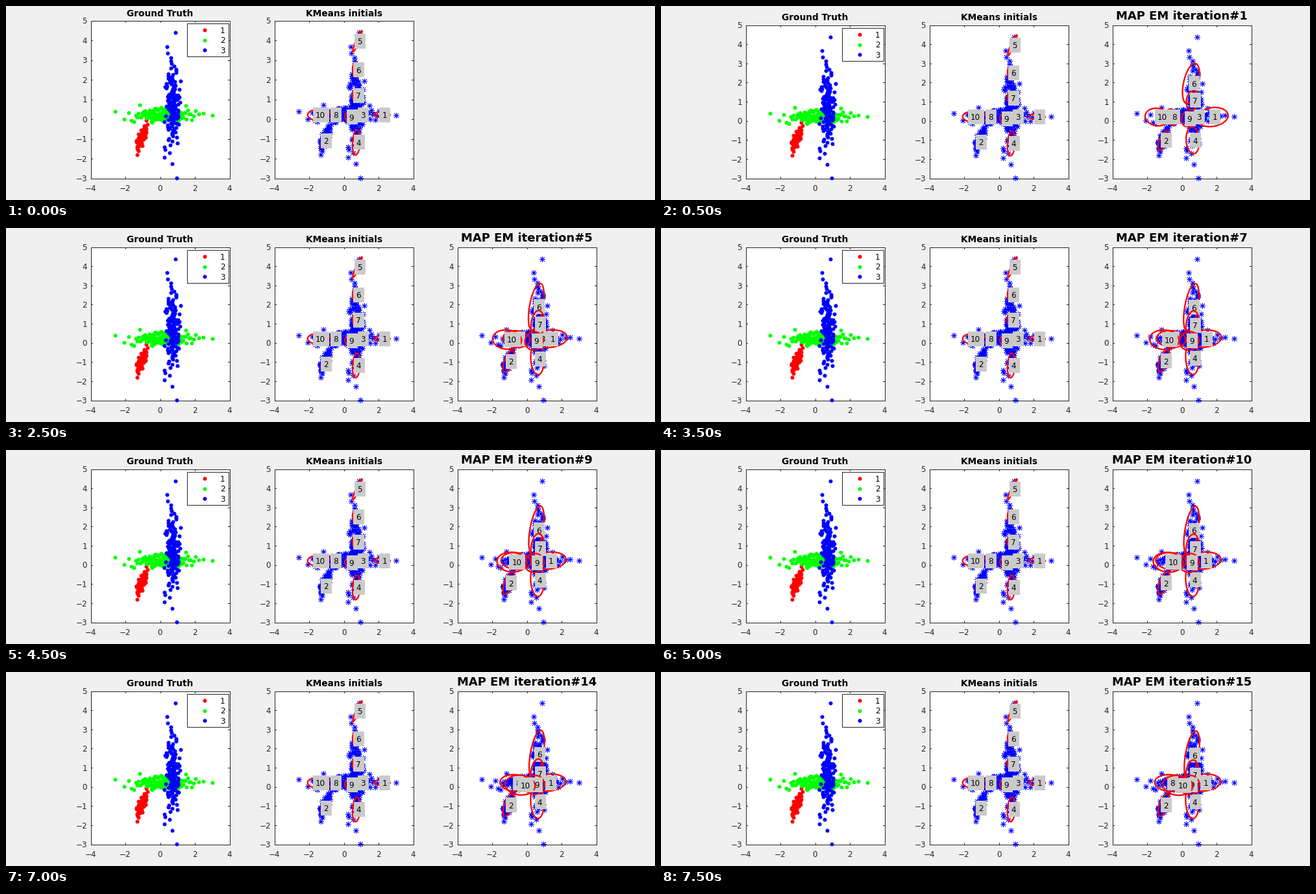
A matplotlib script that plays this animation: 1000 px wide and 300 px high, repeating every 8000 ms.

```python
import numpy as np
import matplotlib.pyplot as plt
from matplotlib.animation import FuncAnimation
from matplotlib.patches import Rectangle

W, H, DPI = 1000, 300, 100
PX = 72 / DPI
FRAMES, STEP = 16, 500
BOTTOM, SPAN = 266.5, 214
LEFTS = (130.5, 413.5, 695.5)
INK, GRAY, RED, GREEN, BLUE = "#262626", "#cacaca", "#ff0000", "#00ff00", "#0000ff"

plt.rcParams["font.family"] = "DejaVu Sans"
rng = np.random.default_rng(7)


def cloud(n, mid, scale, width):
    """Evenly ranked bell curve along one axis, random spread across it."""
    u = (np.arange(n) + .5) / n
    along = scale * np.log(u / (1 - u)) / 1.7
    across = width * np.clip(rng.normal(size=n), -2.2, 2.2)
    return along, across, mid


def upright(n, mid, scale, width, slope=0):
    along, across, (x, y) = cloud(n, mid, scale, width)
    return np.column_stack([x + across + slope * along, y + along])


def flat(n, mid, scale, width):
    along, across, (x, y) = cloud(n, mid, scale, width)
    return np.column_stack([x + along, y + across])


groups = [(RED, upright(95, (-1.07, -.93), .28, .12, .3)),
          (GREEN, flat(150, (.2, .27), .84, .2)),
          (BLUE, upright(150, (.7, .7), 1.1, .21))]
points = np.vstack([pts for _, pts in groups])

seeds = np.array([(2.2, .22), (-1.17, -1.1), (.95, .22), (.72, -1.18),
                  (.78, 3.95), (.69, 2.5), (.69, 1.2), (-.62, .22),
                  (.3, .1), (-1.62, .22)])


def nearest_cells():
    """Label: centre and shape of the points nearest to each seed."""
    owner = np.linalg.norm(points[:, None] - seeds, axis=2).argmin(axis=1)
    return {k + 1: (seed, np.linalg.cholesky(np.cov(points[owner == k].T)
                                             + 1e-4 * np.eye(2)))
            for k, seed in enumerate(seeds)}


def settle(k):
    return 1 - np.exp(-(k - 1) / 2.5)


def drift(k):
    s = (k - 1) / (FRAMES - 2)
    return .8 * s + .2 * s ** 6


# label: pace of the centre, lean, then (cx, cy, rx, ry) at both ends
parts = {
    1: (settle, .15, (1.75, .2, .9, .5), (1.23, .22, 1.0, .45)),
    2: (settle, .2, (-1.05, -1.02, .25, .5), (-1.05, -.95, .25, .58)),
    3: (settle, 0, (.85, .22, .2, .25), (.75, .22, .2, .25)),
    4: (settle, -.04, (.63, -1.02, .38, .7), (.6, -.78, .38, .87)),
    6: (drift, .22, (.53, 1.95, .44, 1.05), (.58, 1.65, .38, 1.27)),
    7: (drift, .06, (.63, 1.07, .37, .5), (.6, .62, .38, .78)),
    8: (drift, -.08, (-.57, .2, .35, .42), (-.68, .2, .88, .44)),
    9: (settle, .03, (.3, .1, .31, .4), (.44, .1, .57, .5)),
    10: (drift, -.06, (-1.41, .2, .7, .46), (-.23, .08, .86, .52)),
}
MERGE_AT = 6


def mixture(k):
    out = {}
    for label, (pace, lean, start, end) in parts.items():
        if label == 3 and k >= MERGE_AT:
            continue
        a, b = np.array(start), np.array(end)
        centre = a[:2] + (b - a)[:2] * pace(k)
        rx, ry = a[2:] + (b - a)[2:] * settle(k)
        out[label] = centre, np.array([[rx, lean], [0, ry]])
    return out


initial = nearest_cells()
turn = np.linspace(0, 2 * np.pi, 80)
circle = np.array([np.cos(turn), np.sin(turn)])
fig = plt.figure(figsize=(W / DPI, H / DPI), dpi=DPI, facecolor="#f0f0f0")


class Panel:
    def __init__(self, ax, left, top, title, size=13.8, lift=7):
        self.ax, self.left, self.top = ax, left, top
        self.box(left, top, SPAN, BOTTOM - top, 0, fc="white", ec="none")
        self.write(left + SPAN / 2, top - lift, title, size, weight="bold")
        self.frame()

    def place(self, x, y):
        return (self.left + (np.asarray(x) + 4) / 8 * SPAN,
                BOTTOM - (np.asarray(y) + 3) / 8 * (BOTTOM - self.top))

    def write(self, x, y, text, size=12, ha="center", **kw):
        text = str(text).replace("-", "\u2212")
        self.ax.text(x, y, text, fontsize=size * PX, ha=ha, va="baseline", **kw)

    def box(self, x, y, w, h, z, **kw):
        self.ax.add_patch(Rectangle((x, y), w, h, lw=PX, zorder=z, **kw))

    def dots(self, x, y, color, z=2):
        self.ax.plot(x, y, "o", ms=6 * PX, mfc=color, mec="none", zorder=z)

    def stars(self):
        self.ax.plot(*self.place(*points.T), ls="", marker=(8, 2, 0),
                     ms=8.6 * PX, mec=BLUE, mew=.85 * PX, zorder=2)

    def frame(self):
        line = dict(color=INK, lw=PX, zorder=1.5)
        right = self.left + SPAN
        self.box(self.left, self.top, SPAN, BOTTOM - self.top, 1.5,
                 fc="none", ec=INK)
        for v in range(-4, 5, 2):
            x, _ = self.place(v, 0)
            self.ax.plot([x, x], [BOTTOM, BOTTOM - 2.5], **line)
            self.ax.plot([x, x], [self.top, self.top + 2.5], **line)
            self.write(x, 285.5, v, color=INK)
        for v in range(-3, 6):
            _, y = self.place(0, v)
            self.ax.plot([self.left, self.left + 2.5], [y, y], **line)
            self.ax.plot([right, right - 2.5], [y, y], **line)
            self.write(self.left - 5.5, y + 4.8, v, ha="right", color=INK)

    def clusters(self, items):
        # each label tag covers the outlines drawn before it
        for label, (centre, shape) in sorted(items.items()):
            z = 3 + label / 10
            outline = centre[:, None] + shape @ circle
            self.ax.plot(*self.place(*outline), color=RED, lw=2.3 * PX, zorder=z)
            x, y = self.place(*centre)
            self.box(x - 4, y - 11.5, 9.5 + 7.5 * len(str(label)), 23, z + .02,
                     fc=GRAY, ec="none")
            self.write(x, y + 4.8, label, ha="left", zorder=z + .04)

    def legend(self):
        x, y = self.left + 148, self.top + 4
        self.box(x, y, 64, 51.5, 4, fc="white", ec=INK)
        for k, (color, _) in enumerate(groups):
            row = y + 10.7 + 15.4 * k
            self.dots(x + 27.5, row, color, 5)
            self.write(x + 51.5, row + 4.6, k + 1, ha="left", zorder=5)


def draw(i):
    fig.clear()
    ax = fig.add_axes([0, 0, 1, 1])
    ax.set(xlim=(0, W), ylim=(H, 0))
    ax.axis("off")
    top = 29.5 if i else 22.5

    truth = Panel(ax, LEFTS[0], top, "Ground Truth")
    for color, pts in groups:
        truth.dots(*truth.place(*pts.T), color)
    truth.legend()

    start = Panel(ax, LEFTS[1], top, "KMeans initials")
    start.stars()
    start.clusters(initial)

    if i:
        fit = Panel(ax, LEFTS[2], top, f"MAP EM iteration#{i}", 18, 8.5)
        fit.stars()
        fit.clusters(mixture(i))
    return []


anim = FuncAnimation(fig, draw, frames=FRAMES, init_func=lambda: draw(0),
                     interval=STEP, repeat=True, repeat_delay=0, blit=False)
plt.show()
```
